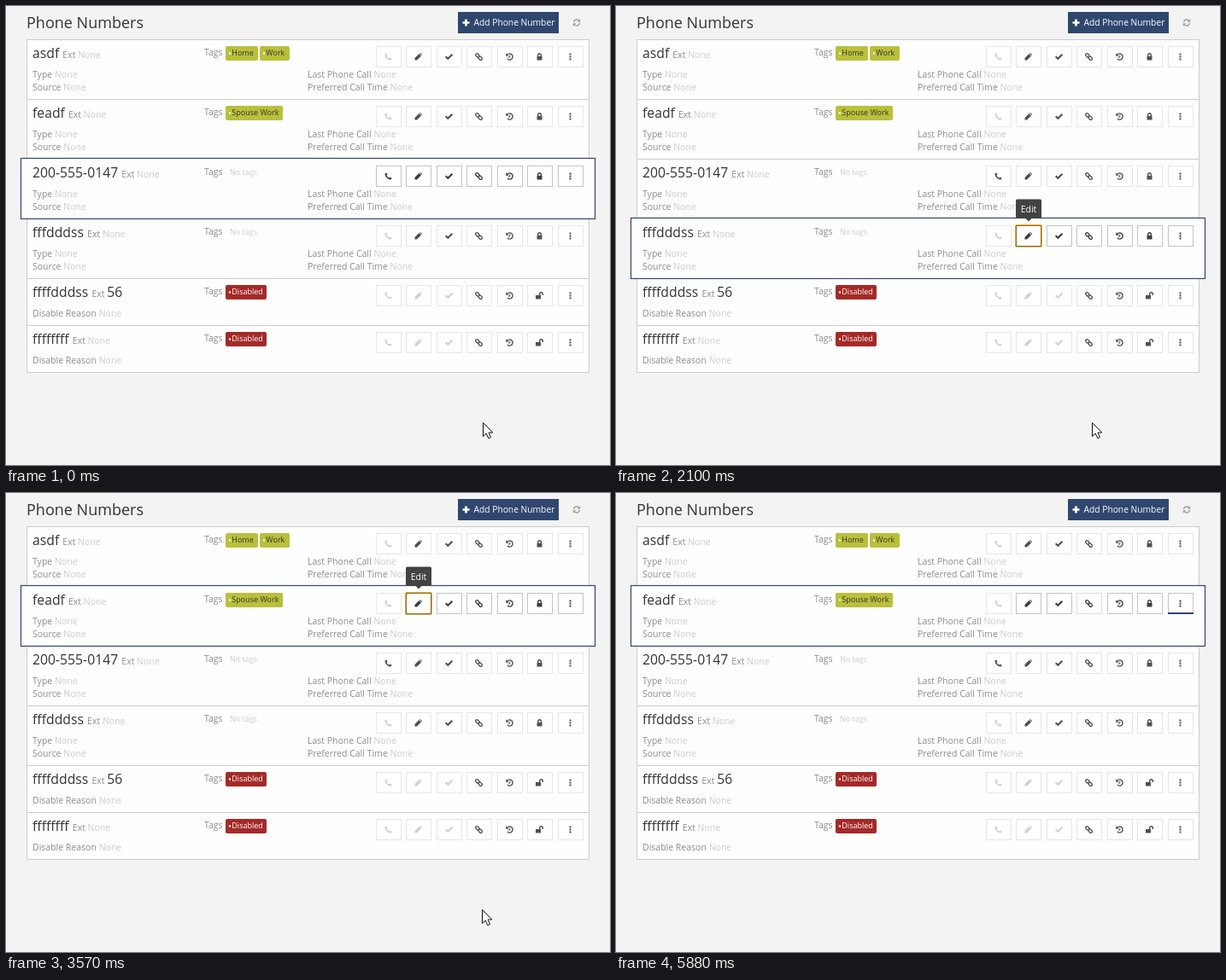
Animation of 707 by 538 pixels, one loop 5950 ms. Source, as an HTML page:

```html
<!DOCTYPE html>
<html lang="en">
<head>
<meta charset="utf-8">
<title>Phone Numbers</title>
<style>
html, body { margin: 0; width: 100%; height: 100%; overflow: hidden; background: #f3f3f3; }
svg { display: block; font: 10.5px "Open Sans", sans-serif; }
text { white-space: pre; fill: #8c8c8c; }
.name { font-size: 15.75px; fill: #333; }
.none { fill: #ccc; }
.small { font-size: 9px; }
</style>
</head>
<body>
<svg id="stage" width="707" height="538" viewBox="0 0 707 538"></svg>
<script>
const LOOP = 5950, FADE = 70;
const NAVY = '#2f476f';
const rows = [
  { y: 39, name: 'asdf', tags: [['Home', 38], ['Work', 35]] },
  { y: 109, name: 'feadf', tags: [['Spouse Work', 67]] },
  { y: 179, name: '200-555-0147', tags: [], callable: true },
  { y: 249, name: 'fffdddss', tags: [] },
  { y: 319, name: 'ffffdddss', ext: '56', tags: [['Disabled', 48]], disabled: true },
  { y: 374, name: 'ffffffff', tags: [['Disabled', 48]], disabled: true }
];
const tips = ['Call', 'Edit', 'Verify', 'Link', 'History', 'Disable', 'More'];
const tipWidths = [30, 30, 38, 32, 46, 47, 36];

// [start ms, selected row, hovered button]
const steps = [
  [0, 2], [1050, 1], [1190, 0], [1470, 1], [1610, 2], [1750, 3],
  [2100, 3, 1], [2240, 3, 2], [2310, 3, 3], [2450, 3, 4], [2590, 3, 5],
  [2730, 3, 4], [2870, 3, 3], [3010, 3, 2], [3220, 2], [3360, 1],
  [3570, 1, 1], [3710, 1, 2], [3850, 1, 3], [3990, 1, 4], [4200, 1, 3],
  [4340, 1, 2], [4480, 1, 1], [4550, 1, 2], [4620, 1, 3], [4690, 1, 5],
  [4760, 1, 6], [5880, 1]
];

const fill = d => `<path d="${d}"/>`;
const line = (d, w = 1.4) => `<path d="${d}" fill="none" stroke="currentColor" stroke-width="${w}"/>`;
const icons = {
  phone: fill('M-4-2.8C-4 1 0 4 2.8 4L4 2.8 3.8 1.9 2 1 .9 2C-.3 1.5-1.5.3-2-.9L-1-2-1.9-3.8-2.8-4Z'),
  pencil: fill('M-4 4V1.5L1-3.5 3.5-1-1.5 4ZM1.6-4 2.4-4.6 4.6-2.4 4-1.6Z'),
  check: line('M-3.8-.2-1.2 2.3 3.9-2.8', 2.1),
  link: `<g transform="rotate(45)" fill="none" stroke="currentColor" stroke-width="1.3">
    <rect x="-4.8" y="-1.6" width="5" height="3.2" rx="1.5"/><rect x="-.2" y="-1.6" width="5" height="3.2" rx="1.5"/></g>`,
  history: line('M-2.8-2.3A3.6 3.6 0 1 1-2.6 2.5') + fill('M-4.3-4.2V-.7H-.8Z') + line('M.3-2V.6H-1.5', 1),
  lock: fill('M-3-.5H3V4H-3Z') + line('M-1.8-.5V-2A1.8 1.8 0 0 1 1.8-2V-.5'),
  unlock: fill('M-4.5-.5H1.5V4H-4.5Z') + line('M.2-.5V-2A1.8 1.8 0 0 1 3.8-2V-.6'),
  dots: fill('M-1-4H1V-2H-1ZM-1-1H1V1H-1ZM-1 2H1V4H-1Z'),
  plus: fill('M-1.3-4H1.3V-1.3H4V1.3H1.3V4H-1.3V1.3H-4V-1.3H-1.3Z'),
  refresh: line('M-3.5-.7A3.5 3.5 0 0 1 2.6-2.4M3.5.7A3.5 3.5 0 0 1-2.6 2.4') + fill('M4.2-4.2V-.7H.7ZM-4.2 4.2V.7H-.7Z')
};
const icon = (name, x, y, color) =>
  `<g transform="translate(${x} ${y})" fill="${color}" color="${color}">${icons[name]}</g>`;
const rect = (x, y, w, h, color, more = '') =>
  `<rect x="${x}" y="${y}" width="${w}" height="${h}" fill="${color}" ${more}/>`;
const text = (x, y, s, more = '') => `<text x="${x}" y="${y}" ${more}>${s}</text>`;
const span = (cls, s) => `<tspan class="${cls}">${s}</tspan>`;
const field = (x, y, label) => text(x, y, `${label} ${span('none', 'None')}`);
const buttonX = i => Math.floor(433 + 35.5 * i);

function tagList({ y, tags, disabled }) {
  if (!tags.length) return text(262, y + 19, 'No tags', 'class="small none"');
  let x = 257;
  return tags.map(([label, w]) => {
    const out = rect(x, y + 8, w, 17, disabled ? '#a42a28' : '#b9c03a', 'rx="2"') +
      `<circle cx="${x + 5}" cy="${y + 16.5}" r="1.2" fill="#fff"/>` +
      text(x + 7.3, y + 19, label, `class="small" style="fill:${disabled ? '#fff' : '#333'}"`);
    x += w + 2;
    return out;
  }).join('');
}

function button(row, i, selected, hovered, settled, faint) {
  const x = buttonX(i), y = row.y + 8;
  const off = i === 0 ? !row.callable : row.disabled && i < 3;
  const solid = selected && !off;
  const stroke = hovered ? '#8f6c1c' : faint ? '#ddd' : solid ? '#c4c4c4' : '#ccc';
  const name = ['phone', 'pencil', 'check', 'link', 'history', row.disabled ? 'unlock' : 'lock', 'dots'][i];
  return (hovered ? rect(x - .5, y - .5, 31, 26, 'none', 'stroke="#d8b04c" rx="1"') : '') +
    rect(x + .5, y + .5, 29, 24, '#fff', `stroke="${stroke}" ${solid ? '' : 'stroke-dasharray="1 1"'}`) +
    (settled ? rect(x, y + 23, 30, 2, NAVY) : '') +
    icon(name, x + 14.5, y + 12.5, off ? '#d0d0d0' : selected ? '#3c3c3c' : '#505050');
}

function drawRow(row, r, now, before, faintLink) {
  const { y } = row, selected = r === now[1];
  let out = selected ? rect(17.5, y - .5, 672, 71, '#fefefe', `stroke="${NAVY}" stroke-width="1.2"`) : '';
  out += text(31, y + 22, span('name', row.name + ' ') + 'Ext ' +
    (row.ext ? span('name', row.ext) : span('none', 'None')));
  out += text(232, y + 19, 'Tags') + tagList(row);
  out += row.disabled ? field(31, y + 45, 'Disable Reason') :
    field(31, y + 45, 'Type') + field(31, y + 60, 'Source') +
    field(353, y + 45, 'Last Phone Call') + field(353, y + 60, 'Preferred Call Time');
  for (let i = 0; i < 7; i++) {
    const settled = selected && before[1] === r && before[2] === i;
    out += button(row, i, selected, selected && now[2] === i, settled, faintLink && r === 1 && i === 3);
  }
  return out;
}

function tooltip([, r, i]) {
  if (i === undefined) return '';
  const x = buttonX(i) + 15, y = rows[r].y - 22.5, w = tipWidths[i];
  return rect(x - w / 2, y, w, 22.5, '#424242', 'rx="1.5"') +
    `<path d="M${x - 4} ${y + 22}h8l-4 4z" fill="#424242"/>` +
    text(x, y + 15, tips[i], 'text-anchor="middle" style="fill:#fff"');
}

const cursor = x => `<path transform="translate(${x} 488.5)" d="M0 0V16L3.7 12.5 6.3 18.2 9 17 6.5 11.5H11.3Z"
  fill="#fff" stroke="#111"/>`;

function draw(now, before, cursorX, faintLink) {
  const order = rows.map((row, r) => r).sort((a, b) => (a === now[1]) - (b === now[1]));
  return text(24, 26, 'Phone Numbers', 'style="font-size:18px;fill:#333"') +
    rect(529, 7, 118, 25, NAVY) + icon('plus', 538.5, 19.5, '#fff') +
    text(547.5, 23, 'Add Phone Number', 'style="font-size:10.25px;fill:#fff"') +
    icon('refresh', 668, 19.5, '#999') +
    rect(24.5, 39.5, 658, 390, '#fefefe', 'stroke="#ccc"') +
    rows.slice(1).map(row => rect(25, row.y, 657, 1, '#ccc')).join('') +
    order.map(r => drawRow(rows[r], r, now, before, faintLink)).join('') +
    tooltip(now) + (cursorX ? cursor(cursorX) : '');
}

const stepAt = t => steps.findLast(s => s[0] <= Math.max(0, t));
const stage = document.getElementById('stage');
let shown;
function tick() {
  const t = performance.now() % LOOP;
  const state = [stepAt(t), stepAt(t - FADE), t < 70 ? 558.5 : t < 5250 ? 557.5 : 0, t >= 4340];
  const key = state.join();
  if (key !== shown) {
    stage.innerHTML = draw(...state);
    shown = key;
  }
  requestAnimationFrame(tick);
}
tick();
</script>
</body>
</html>
```
